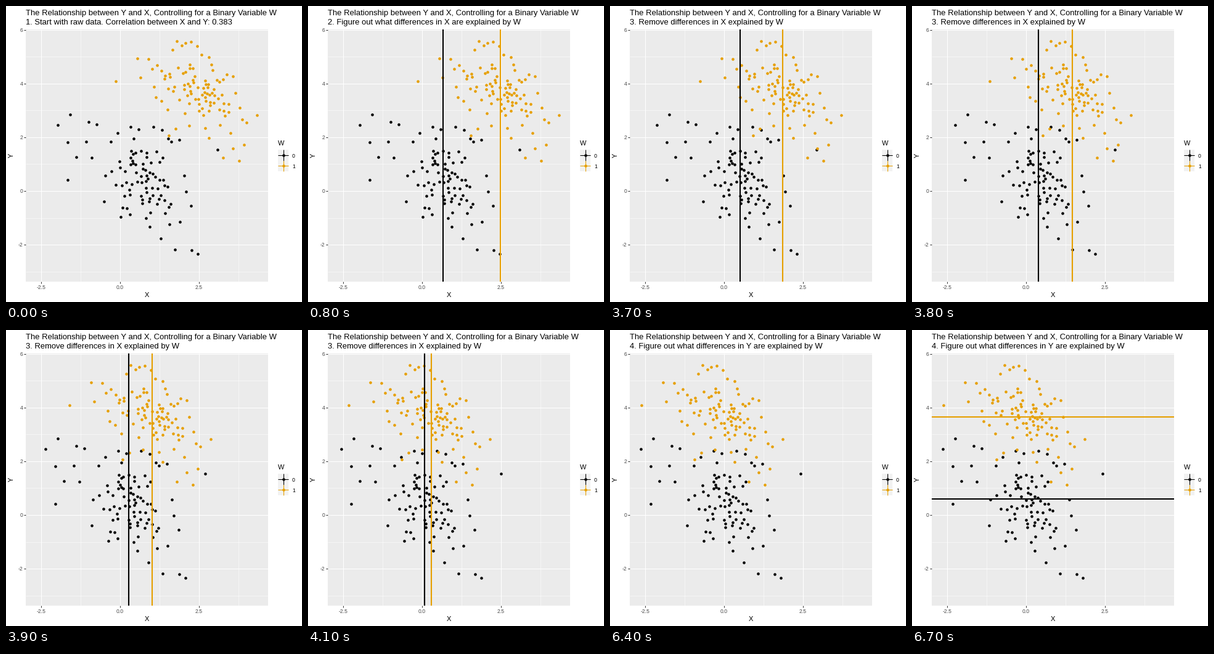
These frames come from a looping animation (480x480 px, 8000 ms). A matplotlib script:

```python
import math

import matplotlib.pyplot as plt
import numpy as np
from matplotlib.animation import FuncAnimation
from matplotlib.patches import Rectangle

SIZE, DPI = 480, 72
STEP_MS, LOOP_MS = 100, 8000
LEFT, RIGHT, TOP, BOTTOM = 32, 425, 38, 447
BLACK, ORANGE = "#000000", "#E69F00"
ZERO_X = 185

plt.rcParams["font.family"] = "Liberation Sans"
plt.rcParams["axes.unicode_minus"] = False

# Outlying points of each cloud, in stage pixels
BLACK_EDGE = [
    (84, 193), (104, 176), (100, 221), (100, 282), (114, 245), (130, 220),
    (134, 188), (139, 246), (147, 192), (159, 317), (161, 275), (171, 268),
    (170, 220), (181, 206), (178, 290), (186, 342), (189, 327), (201, 338),
    (202, 196), (215, 200), (239, 196), (253, 201), (263, 215), (281, 217),
    (343, 233), (289, 275), (292, 301), (300, 324), (282, 350), (265, 354),
    (251, 377), (274, 395), (301, 396), (311, 402), (233, 358), (227, 344),
]
ORANGE_EDGE = [
    (178, 122), (213, 85), (218, 116), (231, 86), (237, 102), (240, 131),
    (243, 148), (245, 96), (252, 154), (262, 168), (264, 210), (275, 199),
    (297, 194), (270, 71), (277, 57), (285, 64), (291, 60), (300, 58),
    (310, 65), (317, 79), (329, 83), (333, 95), (358, 111), (368, 114),
    (372, 141), (379, 165), (383, 184), (390, 189), (407, 177), (386, 225),
    (378, 251), (368, 231), (352, 246), (329, 214), (323, 198), (364, 206),
    (347, 193),
]


def px(value):
    return ZERO_X + 51.2 * value


def py(value):
    return 300 - 43.55 * value


def fill_cloud(edge, count, center, spread, slope, xlim, ylim, seed):
    """Add random core points, tilted along slope and kept slightly apart."""
    rng = np.random.default_rng(seed)
    points = list(edge)
    while len(points) < len(edge) + count:
        x = rng.normal(center[0], spread[0])
        y = rng.normal(center[1] + slope * (x - center[0]), spread[1])
        inside = xlim[0] < x < xlim[1] and ylim[0] < y < ylim[1]
        if inside and all(math.hypot(x - a, y - b) > 4 for a, b in points):
            points.append((x, y))
    return np.array(points, dtype=float)


class Group:
    def __init__(self, ax, color, points, mean_x, mean_y, z):
        self.points, self.mean_x = points, mean_x
        self.dots = ax.scatter(*points.T, s=21, c=color, lw=0, zorder=3)
        style = dict(color=color, lw=2.1, zorder=z, solid_capstyle="butt")
        self.vline, = ax.plot([mean_x] * 2, [TOP, BOTTOM], **style)
        self.hline, = ax.plot([LEFT, RIGHT], [mean_y] * 2, **style)

    def update(self, progress, show_v, show_h):
        shift = (ZERO_X - self.mean_x) * progress
        self.dots.set_offsets(self.points + [shift, 0])
        self.vline.set_xdata([self.mean_x + shift] * 2)
        self.vline.set_visible(show_v)
        self.hline.set_visible(show_h)


fig = plt.figure(figsize=(SIZE / DPI, SIZE / DPI), dpi=DPI, facecolor="white")
ax = fig.add_axes([0, 0, 1, 1])
ax.set(xlim=(0, SIZE), ylim=(SIZE, 0))
ax.axis("off")


def line(xs, ys, color, width, z=1):
    ax.plot(xs, ys, color=color, lw=width, zorder=z, solid_capstyle="butt")


def draw_panel():
    ax.add_patch(Rectangle((LEFT, TOP), RIGHT - LEFT, BOTTOM - TOP,
                           fc="#EBEBEB", lw=0, zorder=0))
    for x in (-1.25, 1.25, 3.75):
        line([px(x)] * 2, [TOP, BOTTOM], "white", 0.53)
    for y in (-3, -1, 1, 3, 5):
        line([LEFT, RIGHT], [py(y)] * 2, "white", 0.53)
    label = dict(size=8.6, color="#4D4D4D")
    for x in (-2.5, 0, 2.5):
        line([px(x)] * 2, [TOP, BOTTOM], "white", 1.07)
        line([px(x)] * 2, [BOTTOM, BOTTOM + 2.7], "#333333", 1.07)
        ax.text(px(x), 459, f"{x:.1f}", ha="center", **label)
    for y in (-2, 0, 2, 4, 6):
        line([LEFT, RIGHT], [py(y)] * 2, "white", 1.07)
        line([LEFT - 2.7, LEFT], [py(y)] * 2, "#333333", 1.07)
        ax.text(27.2, py(y) + 3.2, str(y), ha="right", **label)
    ax.text(228.5, 472, "X", size=11, ha="center")
    ax.text(9, 242.5, "Y", size=11, rotation=90, ha="center", va="center")


def draw_legend():
    ax.text(441, 226, "W", size=11)
    for name, color, y in (("0", BLACK, 242), ("1", ORANGE, 259.3)):
        ax.add_patch(Rectangle((441, y - 8.6), 17.3, 17.3, fc="#F2F2F2", lw=0))
        line([441, 458.3], [y, y], color, 1.07, 2)
        line([449.6] * 2, [y - 8.6, y + 8.6], color, 1.07, 2)
        ax.scatter(449.6, y, s=21, c=color, lw=0, zorder=3)
        ax.text(464, y + 3.6, name, size=8.6)


draw_panel()
draw_legend()
ax.text(32, 15.3, "The Relationship between Y and X, "
        "Controlling for a Binary Variable W", size=13.05)
subtitle = ax.text(32, 30, "", size=13.05)

black_points = fill_cloud(BLACK_EDGE, 62, (228, 272), (27, 38), 0.45,
                          (172, 272), (213, 348), 4)
orange_points = fill_cloud(ORANGE_EDGE, 64, (312, 137), (31, 24), 0.5,
                           (250, 369), (88, 192), 11)
groups = [Group(ax, BLACK, black_points, 219, 274, 4),
          Group(ax, ORANGE, orange_points, 312, 141, 5)]

STEPS = [
    (0, "1. Start with raw data. Correlation between X and Y: 0.383"),
    (500, "2. Figure out what differences in X are explained by W"),
    (3500, "3. Remove differences in X explained by W"),
    (6400, "4. Figure out what differences in Y are explained by W"),
]


def update(i):
    t = i * STEP_MS
    subtitle.set_text([text for start, text in STEPS if t >= start][-1])
    phase = min(max((t - 3400) / 900, 0), 1)
    progress = (1 - math.cos(math.pi * phase)) / 2
    for group in groups:
        group.update(progress, 800 <= t < 6400, t >= 6700)
    return []


anim = FuncAnimation(fig, update, frames=LOOP_MS // STEP_MS,
                     interval=STEP_MS, repeat=True, repeat_delay=0)
plt.show()
```
